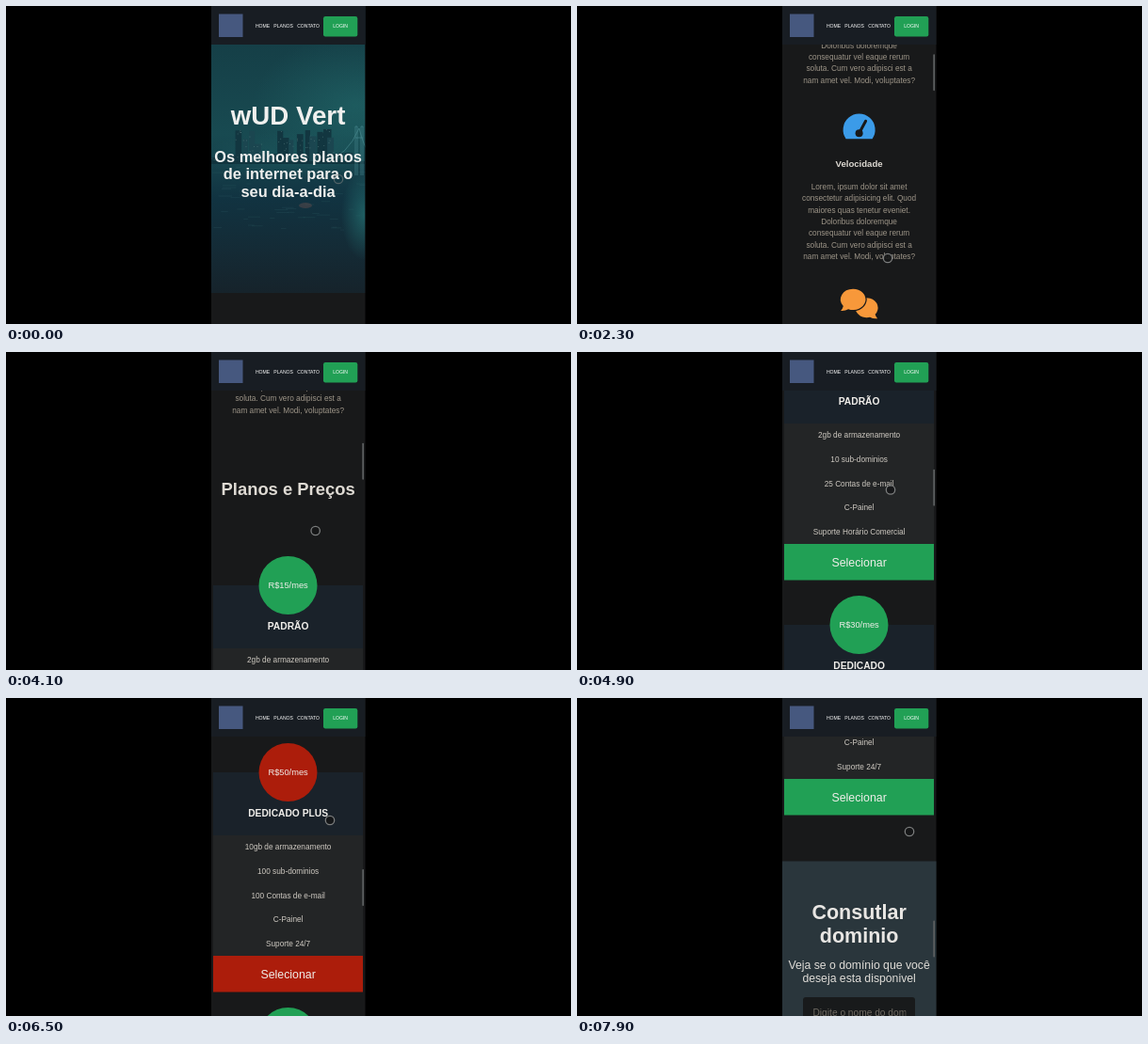
These frames come from a looping animation (600x338 px, 8 s). An HTML page:

```html
<!DOCTYPE html>
<html lang="pt">
<head>
<meta charset="utf-8">
<title>Hospedagem</title>
<style>
html, body { margin: 0; width: 100%; height: 100%; overflow: hidden; background: #000; }
svg { display: block; width: 600px; height: 338px; }
text { font-family: "Liberation Sans", Arial, sans-serif; text-anchor: middle; }
</style>
</head>
<body>
<svg id="stage" viewBox="0 0 600 338">
  <defs>
    <clipPath id="screen"><rect x="218" width="163.5" height="338"/></clipPath>
    <clipPath id="heroClip"><rect x="218" width="163.5" height="305"/></clipPath>
    <clipPath id="field"><rect x="250" y="2340" width="99.5" height="60"/></clipPath>
    <linearGradient id="sky" x1="0" y1="41" x2="0" y2="305" gradientUnits="userSpaceOnUse">
      <stop offset="0" stop-color="#153f47"/>
      <stop offset=".36" stop-color="#184a51"/>
      <stop offset=".48" stop-color="#16424c"/>
      <stop offset=".62" stop-color="#113341"/>
      <stop offset=".82" stop-color="#142b36"/>
      <stop offset="1" stop-color="#16232b"/>
    </linearGradient>
    <radialGradient id="glow">
      <stop offset="0" stop-color="#2a8581" stop-opacity=".65"/>
      <stop offset="1" stop-color="#2a8581" stop-opacity="0"/>
    </radialGradient>
  </defs>
  <rect width="600" height="338"/>
  <g clip-path="url(#screen)">
    <rect x="218" width="164" height="338" fill="#18191a"/>
    <g id="page"></g>
    <g id="head"></g>
    <rect id="thumb" x="378.3" width="1.7" height="39" rx=".8" fill="#5c5f60"/>
    <circle id="cursor" r="4.7" fill="#141617" stroke="#7b7d7d" stroke-width="1.3"/>
  </g>
</svg>
<script>
const NS = "http://www.w3.org/2000/svg";
const $ = id => document.getElementById(id);
const page = $("page"), head = $("head"), thumb = $("thumb"), cursor = $("cursor");
const MID = 299.6, GREEN = "#21a055", RED = "#ac1d0b", BG = "#18191a";

function add(parent, tag, attrs) {
  const el = document.createElementNS(NS, tag);
  for (const k in attrs) el.setAttribute(k, attrs[k]);
  return parent.appendChild(el);
}
function rect(parent, x, y, width, height, fill, more) {
  return add(parent, "rect", { x, y, width, height, fill, ...more });
}
// y is the middle of the capitals
function label(parent, str, y, size, fill, bold, x = MID) {
  const el = add(parent, "text", {
    x, y: y + size * 0.35, fill, "font-size": size, "font-weight": bold ? 700 : 400
  });
  el.textContent = str;
  return el;
}

function hero() {
  const g = add(page, "g", { "clip-path": "url(#heroClip)" });
  rect(g, 218, 0, 164, 305, "url(#sky)");
  const glow = (cx, cy, rx, ry, opacity) =>
    add(g, "ellipse", { cx, cy, rx, ry, opacity, fill: "url(#glow)" });
  glow(372, 105, 110, 75, .5);
  glow(380, 222, 24, 48, .8);
  glow(300, 160, 90, 26, .35);

  let seed = 11;
  const rnd = () => (seed = (seed * 16807) % 2147483647) / 2147483647;
  for (let x = 218; x < 366; x += 4 + rnd() * 5) {
    const tall = (x > 242 && x < 266) || (x > 284 && x < 346);
    const h = tall ? 16 + rnd() * 20 : 5 + rnd() * 8;
    const w = 4 + rnd() * 5;
    rect(g, x, 166 - h, w, h, rnd() < .5 ? "#123640" : "#1b4650");
    for (let i = 0; i < h / 5; i++)
      rect(g, x + rnd() * w, 166 - rnd() * h, 1, .8, "#6c9290", { opacity: .55 });
  }
  rect(g, 218, 165, 164, 3, "#10313b", { opacity: .8 });
  add(g, "path", { d: "M371 180V128h2v52m4 0V128h2v52M371 140h8M340 164Q362 160 375 130Q380 150 386 156",
    fill: "none", stroke: "#4d8f94", "stroke-width": .9, opacity: .65 });
  for (let i = 0; i < 45; i++)
    rect(g, 218 + rnd() * 160, 170 + rnd() * 70, 4 + rnd() * 12, .7, "#3c7179", { opacity: .22 });
  add(g, "ellipse", { cx: 318, cy: 212, rx: 7, ry: 3, fill: "#71504e", opacity: .4 });

  label(page, "wUD Vert", 116.5, 27.7, "#f0f0ee", true);
  ["Os melhores planos", "de internet para o", "seu dia-a-dia"].forEach((s, i) =>
    label(page, s, 160 + i * 18.5, 16.4, "#f0f0ee", true));
}

function shield(g) {
  add(g, "path", { fill: "#4ade80", d: "M0-15.7L13-10.5Q15-9.7 15-7.5C15 3 9.5 12 1.5 15.3Q0 15.8-1.5 15.3C-9.5 12-15 3-15-7.5Q-15-9.7-13-10.5Z" });
  add(g, "path", { fill: BG, d: "M0-11.6L11-7.2C11 2 7 8.5 0 11.4Z" });
}
function gauge(g) {
  add(g, "path", { fill: "#3b9be8", d: "M-14 12A17 17 0 1 1 14 12Z" });
  add(g, "path", { d: "M0 6L7-7", stroke: BG, "stroke-width": 3, "stroke-linecap": "round" });
  add(g, "circle", { cy: 6, r: 4, fill: BG });
}
function chat(g) {
  const fill = "#f7983a";
  add(g, "path", { fill, d: "M-4 5A12 10.5 0 1 1 17 11Q18 14 19.5 15.5Q15 16 11.5 14A12 10.5 0 0 1-4 5Z" });
  add(g, "path", { fill, stroke: BG, "stroke-width": 2.4, "paint-order": "stroke",
    d: "M-6.5-16A13.2 11.2 0 1 1-11.5 5.5Q-15 7.6-19.5 7.2Q-17.5 5-16.8 2.2A13.2 11.2 0 0 1-6.5-16Z" });
}

const LOREM = ["Lorem, ipsum dolor sit amet", "consectetur adipisicing elit. Quod",
  "maiores quas tenetur eveniet.", "Doloribus doloremque", "consequatur vel eaque rerum",
  "soluta. Cum vero adipisci est a", "nam amet vel. Modi, voluptates?"];

function feature(i, title, icon) {
  const y = 418.7 + i * 187.5;
  icon(add(page, "g", { transform: `translate(${MID} ${y - 38})` }));
  label(page, title, y, 9.6, "#dedad3", true);
  LOREM.forEach((s, k) => label(page, s, y + 25 + k * 12.33, 8.25, "#9d9588"));
}

function plan(i, name, price, gb, subs, mails, support, color) {
  const y = 1079 + i * 281;
  rect(page, 220, y, 159, 67, "#1a222a");
  rect(page, 220, y + 67, 159, 128, "#232526");
  rect(page, 220, y + 195, 159, 38.5, color);
  add(page, "circle", { cx: 299.5, cy: y, r: 31, fill: color });
  label(page, price, y, 9.27, "#f0eeea");
  label(page, name, y + 43.5, 10.25, "#f0eeea", true);
  [`${gb}gb de armazenamento`, `${subs} sub-dominios`, `${mails} Contas de e-mail`,
    "C-Painel", support].forEach((s, k) =>
    label(page, s, y + 79.5 + k * 25.6, 8.25, "#cfcac2"));
  label(page, "Selecionar", y + 214.3, 12.35, "#f0eeea");
}

function domain() {
  const y = 2204.5;
  rect(page, 218, y, 164, 300, "#2a363c");
  label(page, "Consutlar", y + 53.5, 21.5, "#e8e6e3", true);
  label(page, "dominio", y + 79, 21.5, "#e8e6e3", true);
  label(page, "Veja se o domínio que você", y + 110, 12.24, "#e0ddd8");
  label(page, "deseja esta disponivel", y + 124.3, 12.24, "#e0ddd8");
  rect(page, 240, y + 144.5, 119, 33, "#181a1b", { rx: 3 });
  const g = add(page, "g", { "clip-path": "url(#field)" });
  label(g, "Digite o nome do domínio", y + 160.5, 10.2, "#6f6a62", false, 250.5)
    .style.textAnchor = "start";
}

function header() {
  rect(head, 218, 0, 164, 41, "#181d23");
  rect(head, 226, 8.5, 25.5, 24.5, "#46587f");
  label(head, "HOME", 21.5, 5.12, "#fff", false, 272.6);
  label(head, "PLANOS", 21.5, 5.12, "#fff", false, 294.6);
  label(head, "CONTATO", 21.5, 5.05, "#fff", false, 321.1);
  rect(head, 337, 11, 36.3, 21.5, GREEN, { rx: 2.2 });
  label(head, "LOGIN", 21.5, 5.12, "#fff", false, 355.1);
}

hero();
feature(0, "Segurança", shield);
feature(1, "Velocidade", gauge);
feature(2, "Suporte 24h", chat);
label(page, "Planos e Preços", 977, 18.4, "#dedad3", true);
plan(0, "PADRÃO", "R$15/mes", 2, 10, 25, "Suporte Horário Comercial", GREEN);
plan(1, "DEDICADO", "R$30/mes", 5, 20, 50, "Suporte Horário Comercial", GREEN);
plan(2, "DEDICADO PLUS", "R$50/mes", 10, 100, 100, "Suporte 24/7", RED);
plan(3, "PREMIUN", "R$100/mes", 20, 200, 200, "Suporte 24/7", GREEN);
domain();
header();

// [time, scroll]
const SCROLL = [[0, 0], [300, 6], [900, 135], [1100, 162], [1700, 330], [1900, 330],
  [2800, 575], [3000, 575], [3400, 646], [3600, 646], [4300, 905], [4600, 905],
  [4900, 1070], [5900, 1354], [7000, 1735], [7900, 2031], [8000, 2058]];
// [time, x, y]
const POINTER = [[0, 353, 184], [300, 347, 262], [900, 345, 140], [1100, 340, 223],
  [1300, 335, 270], [1700, 336, 130], [1900, 336, 130], [2300, 330, 268], [2800, 332, 120],
  [3000, 332, 120], [3400, 326.7, 266], [3600, 326.7, 266], [4000, 329, 140], [4300, 328, 290],
  [4600, 328, 290], [4900, 333, 146.5], [5100, 336, 125], [5400, 340, 275], [5700, 335, 130],
  [5900, 338.5, 256], [6000, 340, 280], [6500, 344, 130], [6800, 346, 270], [7000, 346, 218.5],
  [7200, 348, 125], [7500, 345, 285], [7900, 353, 142], [8000, 354, 125]];

function at(keys, t, col) {
  let i = 1;
  while (i < keys.length - 1 && keys[i][0] <= t) i++;
  const a = keys[i - 1], b = keys[i];
  return a[col] + (b[col] - a[col]) * (t - a[0]) / (b[0] - a[0]);
}

function draw(ms) {
  const t = Math.floor((ms % 8000) / 100) * 100;
  const y = Math.round(at(SCROLL, t, 1));
  page.setAttribute("transform", `translate(0 ${-y})`);
  thumb.setAttribute("y", y * 0.1165);
  thumb.setAttribute("opacity", y > 0 ? 1 : 0);
  cursor.setAttribute("cx", at(POINTER, t, 1));
  cursor.setAttribute("cy", at(POINTER, t, 2));
  cursor.setAttribute("fill-opacity", t ? .85 : 0);
  cursor.setAttribute("stroke-opacity", t ? 1 : .6);
}

const start = performance.now();
function tick() {
  draw(performance.now() - start);
  requestAnimationFrame(tick);
}
draw(0);
requestAnimationFrame(tick);
</script>
</body>
</html>
```
